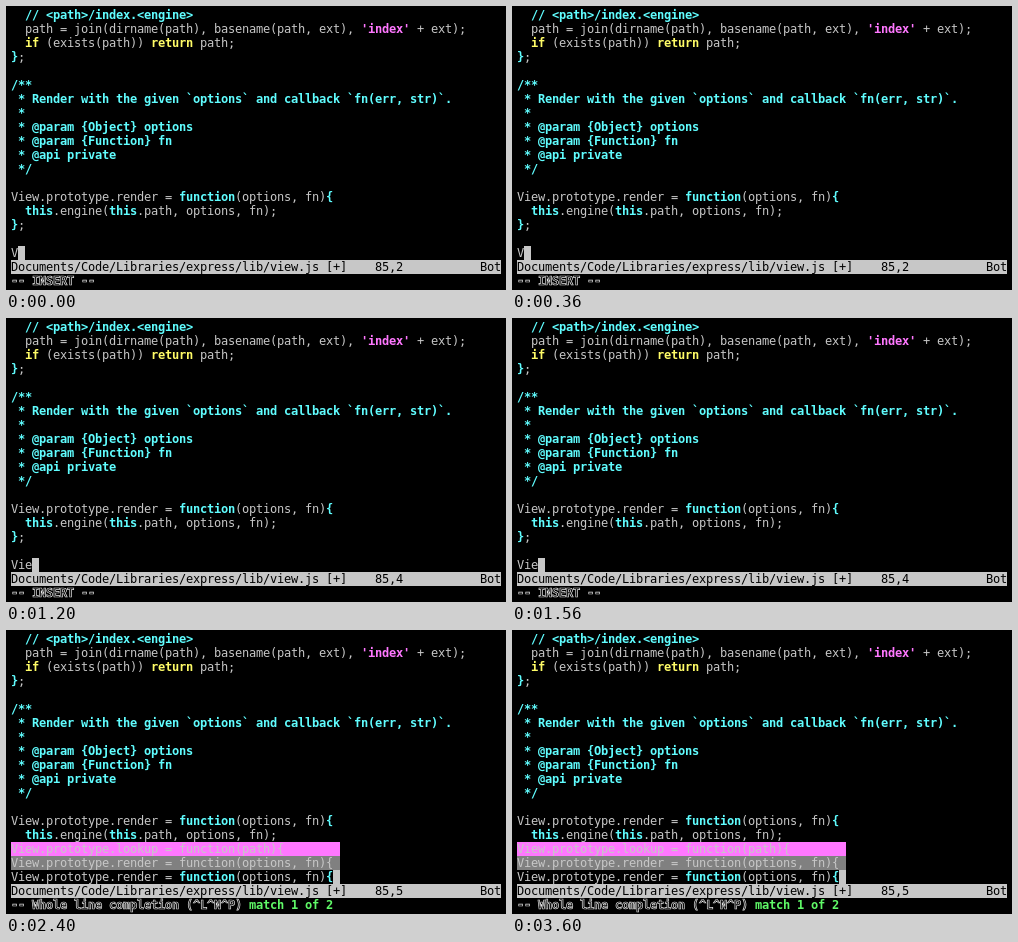
An HTML page that plays this animation: 500x284 px, repeating every 4400 ms.

```html
<!DOCTYPE html>
<html lang="en">
<head>
<meta charset="utf-8">
<title>Whole line completion</title>
<style>
html, body { margin: 0; width: 100%; height: 100%; overflow: hidden; background: #000; }
#term {
  position: absolute; left: 5px; top: 2px; margin: 0;
  font: 12px/14px "DejaVu Sans Mono", monospace;
  letter-spacing: calc(7px - 1ch);
  color: #c7c7c7;
}
#term div { height: 14px; white-space: pre; }
b { color: #60fdff; }
.key { color: #fffc67; }
.str { color: #ff77ff; }
.more { color: #60fa68; }
.mode { color: #000; -webkit-text-stroke: .7px #e8e8e8; }
.bar, .menu, .pick, .cursor { display: inline-block; height: 14px; vertical-align: top; }
.bar { background: #c7c7c7; color: #000; }
.cursor { background: #c7c7c7; }
.menu { background: #ff77ff; }
.pick { background: #808080; }
</style>
</head>
<body>
<pre id="term"></pre>
<script>
const term = document.getElementById('term');
const STEP = 600, LOOP = 4400;
const esc = s => s.replace(/&/g, '&amp;').replace(/</g, '&lt;');
const bold = (s, cls = '') => `<b class="${cls}">${esc(s)}</b>`;
const box = (cls, s, cols) => `<span class="${cls}">${s.padEnd(cols)}</span>`;

const renderLine = 'View.prototype.render = function(options, fn){';
const styledLine = renderLine.replace('function', bold('function')).replace('{', bold('{'));
const comment = ['/**', ' * Render with the given `options` and callback `fn(err, str)`.', ' *',
  ' * @param {Object} options', ' * @param {Function} fn', ' * @api private', ' */'];

const code = [
  bold('  // <path>/index.<engine>'),
  `  path = join(dirname(path), basename(path, ext), ${bold("'index'", 'str')} + ext);`,
  `  ${bold('if', 'key')} (exists(path)) ${bold('return', 'key')} path;`,
  bold('}') + ';',
  '',
  ...comment.map(s => bold(s)),
  '',
  styledLine,
  `  ${bold('this')}.engine(${bold('this')}.path, options, fn);`
];

function screen(step) {
  const done = step === 4;
  const column = Math.min(step + 2, 5);
  const file = 'Documents/Code/Libraries/express/lib/view.js [+]';
  const status = `${file}    85,${column}`.padEnd(67) + 'Bot';
  const above = done
    ? [box('menu', 'View.prototype.lookup = function(path){', 47), box('pick', renderLine, 47)]
    : [bold('}') + ';', ''];
  const typed = done ? styledLine : 'View'.slice(0, step + 1);
  const mode = done
    ? bold('-- Whole line completion (^L^N^P) ', 'mode') + bold('match 1 of 2', 'more')
    : bold('-- INSERT --', 'mode');
  return [...code, ...above, typed + box('cursor', ' ', 1), box('bar', status, 70), mode]
    .map(row => `<div>${row}</div>`).join('');
}

let shown = -1;
function draw() {
  const step = Math.min(4, Math.floor(performance.now() % LOOP / STEP));
  if (step !== shown) term.innerHTML = screen(shown = step);
  requestAnimationFrame(draw);
}
draw();
</script>
</body>
</html>
```
